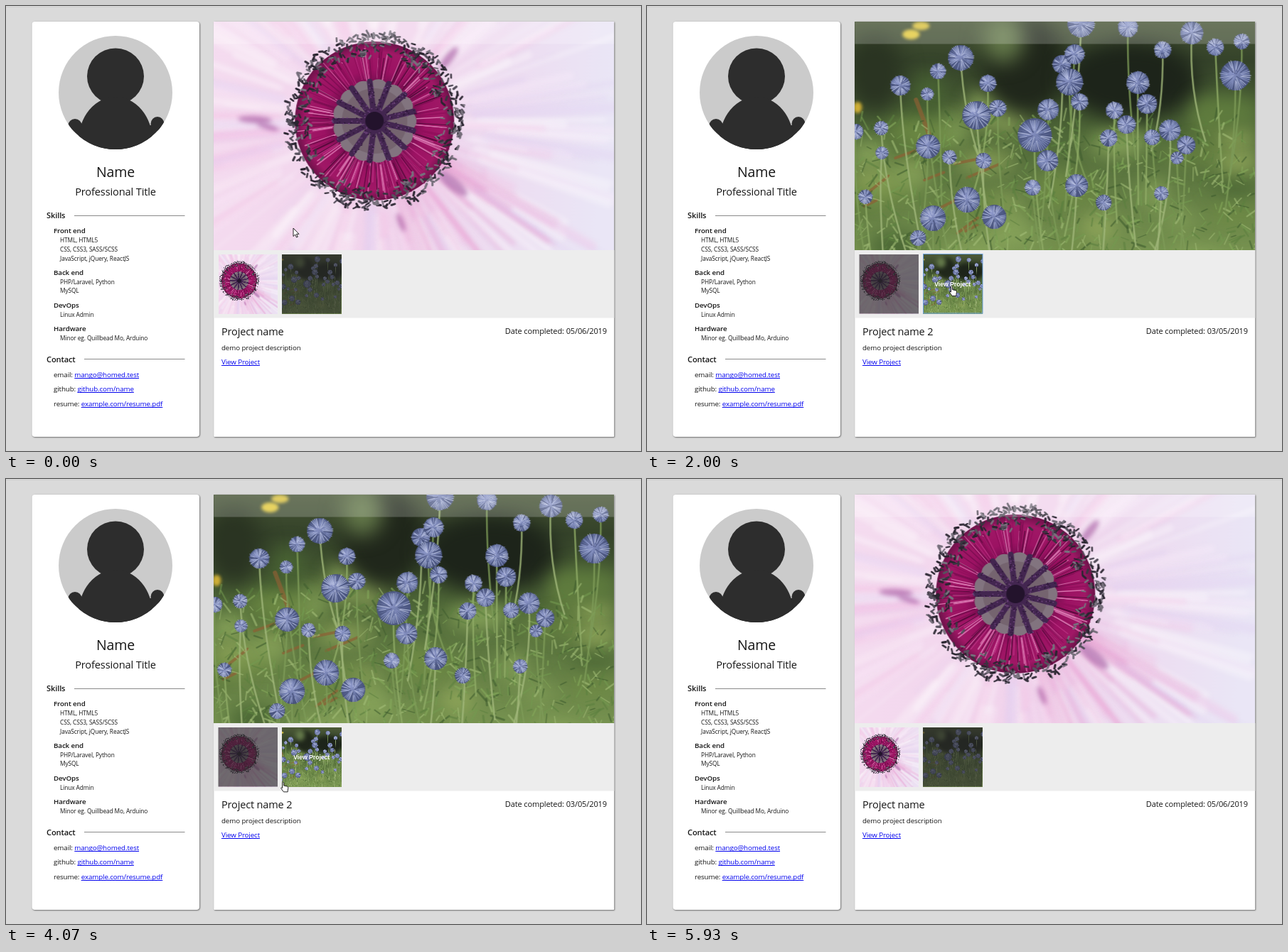
These frames come from a looping animation (893x627 px, 7740 ms). An HTML page with a canvas:

```html
<!DOCTYPE html>
<html lang="en">
<head>
<meta charset="utf-8">
<title>Portfolio</title>
<style>
html, body { margin: 0; width: 893px; height: 627px; overflow: hidden; background: #dadada; }
canvas { display: block; }
</style>
</head>
<body>
<canvas id="stage" width="893" height="627"></canvas>
<script>
const LOOP = 7740;
const ctx = document.getElementById('stage').getContext('2d');
const TAU = Math.PI * 2;

// ---------- photos, painted once in stage coordinates ----------
function makePhoto(paint, seed) {
  const photo = document.createElement('canvas');
  photo.width = 563;
  photo.height = 375;
  const c = photo.getContext('2d');
  c.translate(-292, 5);
  c.lineCap = 'round';
  const rnd = (a = 0, b = 1) => {
    seed = (seed * 1664525 + 1013904223) % 4294967296;
    return a + (b - a) * seed / 4294967296;
  };
  const pick = list => list[Math.floor(rnd(0, list.length))];
  const line = (x1, y1, x2, y2, width, color) => {
    c.strokeStyle = color;
    c.lineWidth = width;
    c.beginPath();
    c.moveTo(x1, y1);
    c.lineTo(x2, y2);
    c.stroke();
  };
  const oval = (x, y, rx, ry, color, turn = 0) => {
    c.fillStyle = color;
    c.beginPath();
    c.ellipse(x, y, rx, ry, turn, 0, TAU);
    c.fill();
  };
  const gradient = (g, ...stops) => {
    stops.forEach(([at, color]) => g.addColorStop(at, color));
    return g;
  };
  paint({ c, rnd, pick, line, oval, gradient });
  return photo;
}

function poppy({ c, rnd, pick, line, oval, gradient }) {
  const X = 518, Y = 162;
  const ray = (a, r1, r2, width, color) =>
    line(X + r1 * Math.cos(a), Y + r1 * Math.sin(a), X + r2 * Math.cos(a), Y + r2 * Math.sin(a), width, color);

  c.fillStyle = gradient(c.createLinearGradient(292, 0, 855, 60), [0, '#f5dcf0'], [.5, '#f1d3ec'], [1, '#eae6f6']);
  c.fillRect(292, -5, 563, 375);

  // petals: soft light and pink streaks around the centre
  c.filter = 'blur(3px)';
  c.globalAlpha = .3;
  for (let i = 0; i < 190; i++)
    ray(rnd(0, TAU), rnd(100, 180), rnd(190, 430), rnd(2, 16), pick(['#fff', '#f3c0e4', '#dccdf0', '#fbeefa', '#fff']));
  c.globalAlpha = .35;
  for (let i = 0; i < 26; i++) ray(rnd(.25, 1.3), 110, rnd(170, 320), rnd(2, 6), '#e48cc8');
  c.globalAlpha = .55;
  [[350, 160, 24, 5, .05], [368, 170, 16, 4, .3], [622, 74, 20, 6, -.9], [628, 250, 26, 8, .7], [555, 305, 14, 4, 1.2]]
    .forEach(([x, y, rx, ry, turn]) => oval(x, y, rx, ry, '#9c4596', turn));
  c.filter = 'none';
  c.globalAlpha = 1;

  oval(X, Y, 112, 112, gradient(c.createRadialGradient(X, Y, 40, X, Y, 112),
    [0, '#5c0c42'], [.45, '#9c1263'], [.8, '#a01866'], [1, '#6c1249']));
  for (let i = 0; i < 230; i++)
    ray(rnd(0, TAU), rnd(50, 65), rnd(85, 112), rnd(.7, 2), pick(['#560a3b', '#b92f80', '#7d0d52', '#d873ae', '#920f5c']));

  // anthers
  for (let i = 0; i < 560; i++) {
    const a = rnd(0, TAU), r = 124 - 32 * rnd() ** 1.5, turn = rnd(0, TAU);
    const x = X + r * Math.cos(a), y = Y + r * Math.sin(a);
    line(x, y, x + 5 * Math.cos(turn), y + 5 * Math.sin(turn), rnd(2, 3.4), pick(['#3a3440', '#57515e', '#2a2530', '#77707c']));
  }

  // seed head
  for (let i = 0; i < 13; i++) {
    const a = i * TAU / 13;
    oval(X + 44 * Math.cos(a), Y + 44 * Math.sin(a), 15, 15, '#82747f');
  }
  oval(X, Y, 46, 46, '#75646f');
  for (let i = 0; i < 13; i++) {
    const a = (i + .5) * TAU / 13;
    ray(a, 8, 56, 8, '#432650');
    for (let k = 0; k < 24; k++) {
      const r = rnd(14, 60), side = rnd(-4.5, 4.5);
      oval(X + r * Math.cos(a) - side * Math.sin(a), Y + r * Math.sin(a) + side * Math.cos(a), .9, .9, pick(['#70467f', '#2d1838']));
    }
  }
  oval(X, Y, 13, 13, '#23132c');
}

// x, y, radius of each flower head
const HEADS = [
  441,73,18, 409,92,11, 356,112,14, 394,124,9, 479,109,12, 493,144,12, 463,154,20, 395,198,17, 425,213,10,
  329,172,10, 330,207,9, 307,269,10, 402,299,18, 450,273,18, 488,297,17, 473,218,11, 381,327,11, 583,82,13,
  594,107,19, 601,68,14, 608,135,12, 564,146,15, 545,182,24, 563,218,15, 604,253,16, 542,256,11, 642,277,11,
  649,186,12, 657,147,12, 690,108,16, 703,138,14, 676,30,14, 610,25,19, 725,62,12, 766,38,16, 799,58,12,
  827,98,21, 836,50,11, 735,175,15, 758,196,13, 710,185,11, 674,167,13, 723,264,10, 745,214,9, 293,177,11
];

function thistles({ c, rnd, pick, line, oval, gradient }) {
  c.fillStyle = gradient(c.createLinearGradient(0, -5, 0, 370),
    [0, '#4d5a38'], [.22, '#35432a'], [.5, '#4f6838'], [1, '#7d9954']);
  c.fillRect(292, -5, 563, 375);

  c.filter = 'blur(14px)';
  for (let i = 0; i < 40; i++)
    oval(rnd(292, 855), rnd(120, 370), rnd(15, 45), rnd(10, 25), pick(['#6f8b45', '#87a35a', '#4a6634', '#93a95c']));
  oval(530, 85, 60, 70, '#20271b');
  oval(680, 105, 95, 55, '#1d241a');
  oval(320, 95, 40, 55, '#2a3422');
  oval(500, 45, 30, 35, '#64794a');
  oval(815, 150, 50, 25, '#5f7c3e');
  c.filter = 'blur(2px)';
  oval(371, 40, 12, 7, '#e2c83a');
  oval(385, 28, 12, 6, '#d9c03c');
  oval(296, 143, 6, 8, '#cfae35');
  c.filter = 'none';

  // rusty spikes, then foliage
  c.globalAlpha = .7;
  for (let i = 0; i < 9; i++) {
    const x = rnd(305, 480), y = rnd(210, 320);
    line(x, y, x + rnd(15, 45), y - rnd(5, 35), 4, '#8d6034');
  }
  line(378, 132, 396, 180, 6, '#8d6034');
  c.globalAlpha = .6;
  for (let i = 0; i < 900; i++) {
    const x = rnd(292, 855), y = 370 - 210 * rnd() ** 1.3, a = rnd(-2.9, -.2), n = rnd(5, 20);
    line(x, y, x + n * Math.cos(a), y + n * Math.sin(a), rnd(1, 3), pick(['#86aa5c', '#5c8040', '#3f5d2f', '#a4be78', '#739a50']));
  }
  c.globalAlpha = .85;
  for (let i = 0; i < HEADS.length; i += 3) {
    const [x, y] = HEADS.slice(i);
    c.strokeStyle = pick(['#8fab66', '#7d9b58', '#a0b77a']);
    c.lineWidth = 2.4;
    c.beginPath();
    c.moveTo(x, y);
    c.quadraticCurveTo(x + rnd(-6, 6), y + 80, x + rnd(-25, 35), y + rnd(140, 230));
    c.stroke();
  }
  c.globalAlpha = 1;
  for (let i = 0; i < HEADS.length; i += 3) {
    const [x, y, r] = HEADS.slice(i);
    oval(x, y, r, r, gradient(c.createRadialGradient(x - r / 4, y - r / 3, 1, x, y, r), [0, '#8e98ca'], [.6, '#66729f'], [1, '#4a557e']));
    for (let k = 0; k < 44; k++) {
      const a = k * TAU / 44, n = r * rnd(.85, 1.06), from = r * rnd(.1, .6);
      line(x + from * Math.cos(a), y + from * Math.sin(a), x + n * Math.cos(a), y + n * Math.sin(a), .9,
        pick(['#a9b3da', '#8a95c4', '#434d78', '#c1c9e6']));
    }
  }
}

const PROJECTS = [
  { photo: makePhoto(poppy, 7), name: 'Project name', date: '05/06/2019', x: 298.5 },
  { photo: makePhoto(thistles, 21), name: 'Project name 2', date: '03/05/2019', x: 388 }
];
const THUMB = { y: 350, size: 83.5 };

// ---------- timeline ----------
// time, shown project, focused thumbnail (-1: none)
const STATES = [[0, 0, -1], [600, 1, 1], [1400, 0, 0], [1900, 1, 1], [3270, 1, -1], [4400, 0, 0], [5400, 0, -1]];
const RELOADS = [3270, 5400];
// time, x, y of the pointer tip
const PATH = [
  [0, 404, 313], [70, 404, 313], [400, 438, 392], [650, 444, 400], [800, 459, 417], [930, 424, 413], [1070, 410, 416],
  [1130, 395, 417], [1340, 348, 402], [1480, 344, 400], [1800, 429, 395], [2000, 429, 395], [2300, 270, 230],
  [2600, 87, 64], [2870, 60, -20], [3550, 60, -20], [4000, 375, 412], [4070, 390, 427], [4300, 346, 396],
  [4450, 344, 392], [4740, 114, 8], [4795, 90, -20], [LOOP, 90, -20]
];

function pointerAt(t) {
  const i = PATH.findIndex(p => p[0] > t);
  const [t0, x0, y0] = PATH[i - 1], [t1, x1, y1] = PATH[i];
  const k = (t - t0) / (t1 - t0);
  return { x: x0 + (x1 - x0) * k, y: y0 + (y1 - y0) * k };
}

// ---------- drawing ----------
function box(x, y, w, h, color) {
  ctx.fillStyle = color;
  ctx.fillRect(x, y, w, h);
}

function card(x, y, w, h, radius) {
  ctx.save();
  ctx.shadowColor = 'rgba(0,0,0,.6)';
  ctx.shadowBlur = 2;
  ctx.shadowOffsetX = ctx.shadowOffsetY = .7;
  ctx.fillStyle = '#fff';
  ctx.beginPath();
  ctx.roundRect(x, y, w, h, radius);
  ctx.fill();
  ctx.restore();
}

function text(str, x, y, size, { weight = 400, align = 'left', color = '#151515', link = false } = {}) {
  const px = size * .955;
  ctx.font = `${weight} ${px}px "Open Sans", "Noto Sans", sans-serif`;
  ctx.letterSpacing = `${-.01 * px}px`;
  ctx.textAlign = align;
  ctx.fillStyle = link ? '#0000ee' : color;
  ctx.fillText(str, x, y);
  const width = ctx.measureText(str).width;
  if (link) ctx.fillRect(x, Math.round(y + 1), width, 1);
  return x + width;
}

function avatar() {
  const disc = (x, y, rx, ry) => {
    ctx.beginPath();
    ctx.ellipse(x, y, rx, ry, 0, 0, TAU);
  };
  ctx.save();
  disc(154, 122, 80, 80);
  ctx.fillStyle = '#cbcbcb';
  ctx.fill();
  ctx.clip();
  box(88, 168, 134, 40, '#2d2d2d');
  [[154, 99, 40, 39.5], [154, 190, 52, 62], [97, 168, 9.5, 9], [213, 166, 9.5, 10]].forEach(e => {
    disc(...e);
    ctx.fill();
  });
  ctx.restore();
}

const SKILLS = [
  [320, 'Front end', 'HTML, HTML5', 'CSS, CSS3, SASS/SCSS', 'JavaScript, jQuery, ReactJS'],
  [378.5, 'Back end', 'PHP/Laravel, Python', 'MySQL'],
  [424.5, 'DevOps', 'Linux Admin'],
  [457.5, 'Hardware', 'Minor eg. Quillbead Mo, Arduino']
];
const CONTACTS = [
  ['email: ', 'mango@homed.test'],
  ['github: ', 'github.com/name'],
  ['resume: ', 'example.com/resume.pdf']
];

function profile() {
  card(36.5, 22, 235.5, 585, 4);
  avatar();
  text('Name', 154, 241, 20.4, { align: 'center' });
  text('Professional Title', 154, 267, 15.3, { align: 'center' });
  text('Skills', 57, 299, 11.6, { weight: 600 });
  box(96, 295, 155.5, 1, '#8a8a8a');
  for (const [y, title, ...items] of SKILLS) {
    text(title, 67, y, 10.2, { weight: 600 });
    items.forEach((item, i) => text(item, 76, y + 13.2 + i * 12.7, 8.7));
  }
  text('Contact', 57, 502, 11.6, { weight: 600 });
  box(110, 497, 141.5, 1, '#8a8a8a');
  CONTACTS.forEach(([label, address], i) => {
    const y = 523 + i * 20.4;
    text(address, text(label, 67, y, 10.2), y, 10.2, { link: true });
  });
}

function thumbnail(project, lit, hovered, focused) {
  const { photo, x } = project, { y, size } = THUMB;
  ctx.drawImage(photo, 94, 0, 375, 375, x, y, size, size);
  if (!lit) box(x, y, size, size, 'rgba(40,40,40,.65)');
  if (hovered) {
    ctx.font = 'bold 8.6px "Liberation Sans", Arial, sans-serif';
    ctx.letterSpacing = '0px';
    ctx.textAlign = 'center';
    ctx.fillStyle = '#fff';
    ctx.fillText('View Project', x + size / 2, 395);
  }
  if (focused) {
    ctx.strokeStyle = '#6a9fdc';
    ctx.lineWidth = 1;
    ctx.strokeRect(Math.floor(x) + .5, y - .5, size, size);
  }
}

function gallery(shown, hover, focus) {
  const { photo, name, date } = PROJECTS[shown];
  card(292.3, 22, 563, 585, 1);
  ctx.drawImage(photo, 0, 27, 563, 322, 292.3, 22, 563, 322);
  box(292.3, 22, 563, 31.5, 'rgba(255,255,255,.2)');
  box(292.3, 344, 563, 95.5, '#ededed');
  PROJECTS.forEach((p, i) => thumbnail(p, i === shown || i === hover, i === hover, i === focus));
  text(name, 303, 464, 15.2);
  text('Date completed: ' + date, 845, 462, 11.55, { align: 'right' });
  text('demo project description', 303, 484.5, 10.2);
  text('View Project', 303, 505, 10.2, { link: true });
}

const ARROW = new Path2D('M0 0V11.5L2.7 9L4.5 13L6.3 12.2L4.5 8.3H8Z');
const HAND = new Path2D('M-1 1Q0-1 1 1V5.2L5.5 6.2Q7.2 6.7 7 8.4L6.4 12V14H0.6L-3.2 8.6Q-2.8 7-1 8.6Z');

function pointer({ x, y }, shape) {
  ctx.save();
  ctx.translate(x, y);
  ctx.fillStyle = '#fff';
  ctx.strokeStyle = '#111';
  ctx.lineWidth = .9;
  ctx.fill(shape);
  ctx.stroke(shape);
  ctx.restore();
}

// whiteness left over a page that is loading
function veilAt(t) {
  const start = RELOADS.find(s => t >= s && t < s + 530);
  return start === undefined ? 0 : 1 - Math.max(0, (t - start - 60) / 470);
}

function draw(t) {
  const [, shown, focus] = STATES.findLast(s => s[0] <= t);
  const tip = pointerAt(t);
  const hover = PROJECTS.findIndex(({ x }) =>
    tip.x >= x && tip.x <= x + THUMB.size && tip.y >= THUMB.y && tip.y <= THUMB.y + THUMB.size);

  box(0, 0, 893, 627, '#dadada');
  box(0, 1, 893, 1, '#cfcfcf');
  profile();
  gallery(shown, hover, focus);

  ctx.globalAlpha = veilAt(t);
  box(0, 1, 893, 626, '#fefefe');
  box(0, 1, 893, 1, '#e2e2e2');
  box(892, 1, 1, 626, '#dedede');
  ctx.globalAlpha = 1;

  pointer(tip, hover < 0 ? ARROW : HAND);
}

function tick() {
  draw(performance.now() % LOOP);
  requestAnimationFrame(tick);
}
tick();
</script>
</body>
</html>
```
